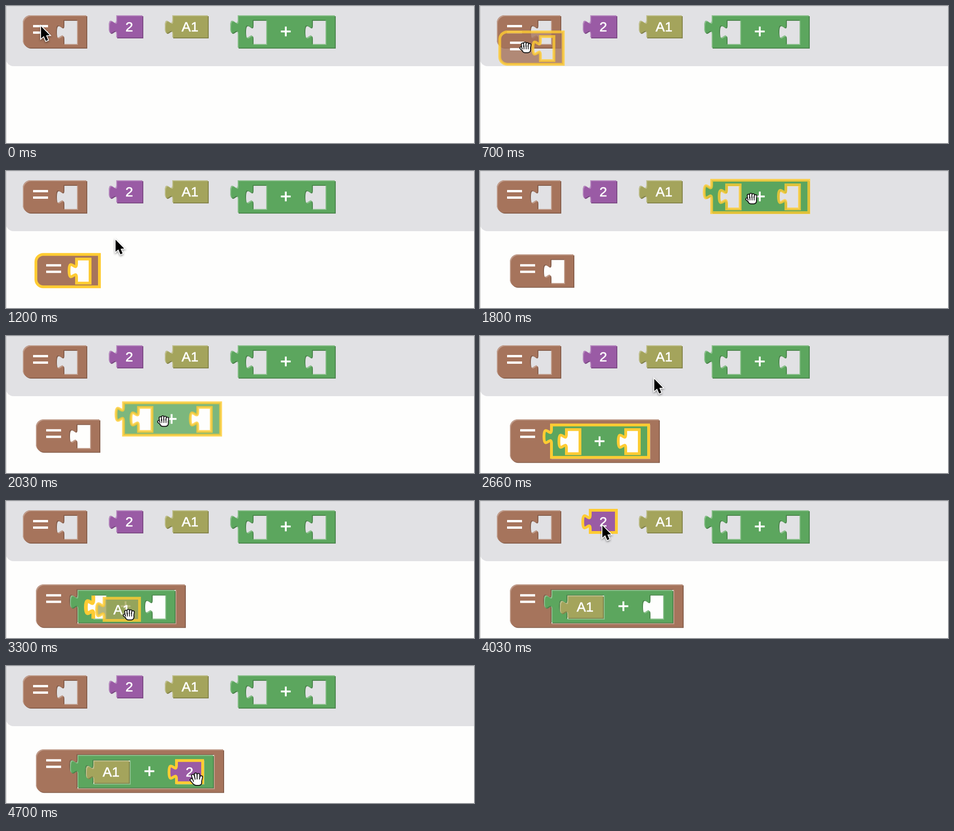
Write an HTML page with a canvas that moves like this. It is 1002x296 px and loops after 5.83 s.

```html
<!DOCTYPE html>
<html lang="en">
<head>
<meta charset="utf-8">
<title>Formula blocks</title>
<style>
html, body { margin: 0; width: 100%; height: 100%; overflow: hidden; background: #fefefd; }
canvas { display: block; }
</style>
</head>
<body>
<canvas id="stage" width="1002" height="296"></canvas>
<script>
const ctx = document.getElementById('stage').getContext('2d');
const LOOP = 5830;
const YELLOW = '#ffcc33';
const EMPTY = 29, SNAP = 32;
const COLORS = { eq: [166, 116, 92], add: [92, 166, 94], cell: [164, 164, 92], num: [154, 91, 165] };

// Pointer hot spot: time, x, y
const KEYS = [
  [0, 75, 44], [560, 75, 44], [1020, 103, 204], [1145, 103, 204],
  [1200, 233, 149], [1400, 470, 80], [1660, 565, 50], [1800, 565, 50],
  [2030, 321, 174], [2330, 237, 208], [2460, 237, 208],
  [2660, 373, 93], [2920, 393, 46], [3060, 393, 46],
  [3300, 247, 236], [3480, 242, 234], [3560, 242, 234],
  [3990, 262, 53], [4150, 262, 53], [4230, 331, 128], [4680, 392, 237], [LOOP, 392, 237]
];

// Each drag: pressed, lifted, dropped, deselected, grip offset, home in the palette, resting place
const DRAGS = [
  { kind: 'eq', press: 400, lift: 560, drop: 1030, off: 1700, grip: [39, 24], home: [36, 20], rest: [64, 180.3] },
  { kind: 'add', press: 1700, lift: 1800, drop: 2460, off: 2960, grip: [69, 30], home: [496, 20], rest: [153, 192.3] },
  { kind: 'cell', press: 2960, lift: 3060, drop: 3500, off: 4030, grip: [37, 26], home: [356, 20], rest: [187, 204.3] },
  { kind: 'num', press: 4030, lift: 4160, drop: 4690, off: LOOP, grip: [26, 33], home: [236, 20], rest: [365, 204.3] }
];

const rgb = c => `rgb(${c.map(Math.round)})`;
const mix = (c, to, k) => rgb(c.map(v => v + (to - v) * k));

// Monotone cubic through the keys
function slope(i, a) {
  if (i < 1 || i >= KEYS.length - 1) return 0;
  const rate = j => (KEYS[j + 1][a] - KEYS[j][a]) / (KEYS[j + 1][0] - KEYS[j][0]);
  const p = rate(i - 1), q = rate(i);
  return p * q > 0 ? 2 * p * q / (p + q) : 0;
}

function pointer(t) {
  let i = 0;
  while (i < KEYS.length - 2 && t >= KEYS[i + 1][0]) i++;
  const d = KEYS[i + 1][0] - KEYS[i][0], u = (t - KEYS[i][0]) / d;
  return [1, 2].map(a => {
    const p = KEYS[i][a], q = KEYS[i + 1][a];
    return p + (q - p) * u * u * (3 - 2 * u)
      + d * u * (1 - u) * ((1 - u) * slope(i, a) - u * slope(i + 1, a));
  });
}

function tab(p, x, y) {
  p.lineTo(x, y + 10);
  p.bezierCurveTo(x, y + 30, x - 16, y - 6, x - 16, y + 25);
  p.bezierCurveTo(x - 16, y + 56, x, y + 20, x, y + 40);
}

// Size, holes [x, width, height] and label place of a block
function layout(kind, fill) {
  if (kind === 'eq') {
    const add = fill.add && layout('add', fill);
    const hole = add ? [87, add.w + 4, 74] : [87, EMPTY, 52];
    return { w: hole[0] + hole[1] + 20, h: hole[2] + 18, holes: [hole] };
  }
  if (kind === 'add') {
    const a = fill.cell ? 80 : EMPTY, b = fill.num ? 60 : EMPTY;
    return { w: a + b + 150, h: 70, holes: [[32, a, 52], [a + 130, b, 52]], mid: a + 75 };
  }
  return { w: kind === 'cell' ? 76 : 56, h: 48, holes: [] };
}

function outline(kind, box, x, y) {
  const p = new Path2D(), { w, h } = box, r = 16;
  if (kind === 'eq') {
    p.roundRect(x, y, w, h, [r, 0, 0, r]);
  } else {
    p.moveTo(x, y);
    tab(p, x, y);
    p.lineTo(x, y + h);
    p.lineTo(x + w, y + h);
    p.lineTo(x + w, y);
    p.closePath();
  }
  for (const [hx, hw, hh] of box.holes) {
    const l = x + hx, top = y + 10;
    p.moveTo(l + hw, top);
    p.lineTo(l, top);
    tab(p, l, top);
    p.lineTo(l, top + hh);
    p.lineTo(l + hw, top + hh);
    p.closePath();
  }
  return p;
}

function label(kind, box, x, y) {
  ctx.fillStyle = ctx.strokeStyle = '#fff';
  if (kind === 'eq') {
    ctx.fillRect(x + 22, y + 21, 32, 5);
    ctx.fillRect(x + 22, y + 35, 32, 5);
  } else if (kind === 'add') {
    const cx = x + box.mid - 1, cy = y + 35;
    ctx.fillRect(cx - 10.5, cy - 2, 21, 4);
    ctx.fillRect(cx - 2, cy - 10.5, 4, 21);
  } else {
    const text = kind === 'cell' ? 'A1' : '2';
    ctx.font = '29.33px "Liberation Sans", Arial, sans-serif';
    ctx.textAlign = 'center';
    ctx.lineWidth = 0.7;
    ctx.fillText(text, x + box.w / 2, y + 35);
    ctx.strokeText(text, x + box.w / 2, y + 35);
  }
}

function block(kind, x, y, { selected = false, dragged = false, fill = {} } = {}) {
  const box = layout(kind, fill), c = COLORS[kind];
  const path = outline(kind, box, x, y);
  const low = outline(kind, box, x + 2, y + 2);
  ctx.save();
  if (dragged) ctx.globalAlpha = 0.8;
  if (!selected) {
    ctx.fillStyle = mix(c, 0, 0.2);
    ctx.fill(low, 'evenodd');
  }
  ctx.fillStyle = rgb(c);
  ctx.fill(path, 'evenodd');
  if (selected) {
    ctx.strokeStyle = YELLOW;
    ctx.lineWidth = 6;
    ctx.stroke(path);
  } else {
    const rim = new Path2D(path);
    rim.addPath(low);
    ctx.clip(path, 'evenodd');
    ctx.fillStyle = mix(c, 255, 0.3);
    ctx.fill(rim, 'evenodd');
  }
  ctx.restore();
  label(kind, box, x, y);
}

function socket(x, y) {
  const p = new Path2D();
  p.moveTo(x, y);
  tab(p, x, y);
  p.lineTo(x, y + 50);
  ctx.strokeStyle = YELLOW;
  ctx.lineWidth = 8;
  ctx.stroke(p);
}

function arrow(x, y) {
  const p = new Path2D();
  [[0, 0], [0, 26], [6, 21], [10.5, 31.5], [15, 29.5], [10.8, 19.5], [18.5, 19]]
    .forEach(([px, py]) => p.lineTo(x + px, y + py));
  p.closePath();
  ctx.save();
  ctx.strokeStyle = '#fff';
  ctx.lineWidth = 3.5;
  ctx.shadowColor = 'rgba(0,0,0,.45)';
  ctx.shadowBlur = 4;
  ctx.shadowOffsetY = 2;
  ctx.stroke(p);
  ctx.restore();
  ctx.fillStyle = '#000';
  ctx.fill(p);
}

const OPEN = [[-5, 7, -11, 0], [-4, 2, -8, -9], [0, 0, -2, -12], [4, 0, 4, -11], [8, 3, 10, -6]];
const FIST = [[-5, 5, -9, 2], [-5, 1, -6, -6], [-1, 0, -1, -8], [4, 0, 4, -7], [8, 1, 9, -5]];

function hand(x, y, fingers) {
  ctx.save();
  ctx.translate(x + 16, y + 9);
  ctx.lineCap = 'round';
  const palm = (color, grow) => {
    ctx.fillStyle = color;
    ctx.beginPath();
    ctx.roundRect(-6 - grow, -1 - grow, 16 + 2 * grow, 12 + 2 * grow, 5 + grow);
    ctx.fill();
  };
  const line = ([a, b, c, d], color, width) => {
    ctx.strokeStyle = color;
    ctx.lineWidth = width;
    ctx.beginPath();
    ctx.moveTo(a, b);
    ctx.lineTo(c, d);
    ctx.stroke();
  };
  palm('#111', 2);
  for (const f of fingers) {
    line(f, '#111', 7.5);
    line(f, '#fff', 3.8);
  }
  palm('#fff', 0);
  if (fingers === FIST) {
    for (const px of [-3, 1.5, 6]) line([px, -3, px, 4], '#111', 1.6);
  }
  ctx.restore();
}

function backdrop() {
  ctx.fillStyle = '#fefefd';
  ctx.fillRect(0, 0, 1002, 296);
  ctx.fillStyle = '#e1e1e4';
  ctx.beginPath();
  ctx.roundRect(0, 0, 1002, 130, [0, 0, 0, 16]);
  ctx.fill();
  ctx.fillStyle = '#d4d4d6';
  ctx.fillRect(0, 0, 1002, 1);
  ctx.fillStyle = '#c4c4c4';
  ctx.fillRect(0, 0, 1, 296);
}

function draw(t) {
  const [mx, my] = pointer(t);
  const fill = {};
  for (const d of DRAGS) fill[d.kind] = t >= d.drop;
  const held = DRAGS.find(d => t >= d.lift && t < d.drop);

  backdrop();
  for (const d of DRAGS) {
    block(d.kind, ...d.home, { selected: t >= d.press && t < d.lift });
  }
  for (const d of DRAGS) {
    if (fill[d.kind]) block(d.kind, ...d.rest, { selected: t < d.off, fill });
  }
  if (held) {
    const x = mx - held.grip[0], y = my - held.grip[1];
    const near = Math.hypot(x - held.rest[0], y - held.rest[1]) < SNAP;
    if (near && held.kind !== 'eq') socket(...held.rest);
    block(held.kind, x, y, { selected: true, dragged: true });
    hand(mx, my, FIST);
  } else {
    const { w, h } = layout('eq', fill);
    const over = fill.eq && mx > 64 && mx < 64 + w && my > 180 && my < 180 + h;
    if (over) hand(mx, my, OPEN);
    else arrow(mx, my);
  }
}

const start = performance.now();
function tick() {
  draw((performance.now() - start) % LOOP);
  requestAnimationFrame(tick);
}
tick();
</script>
</body>
</html>
```
